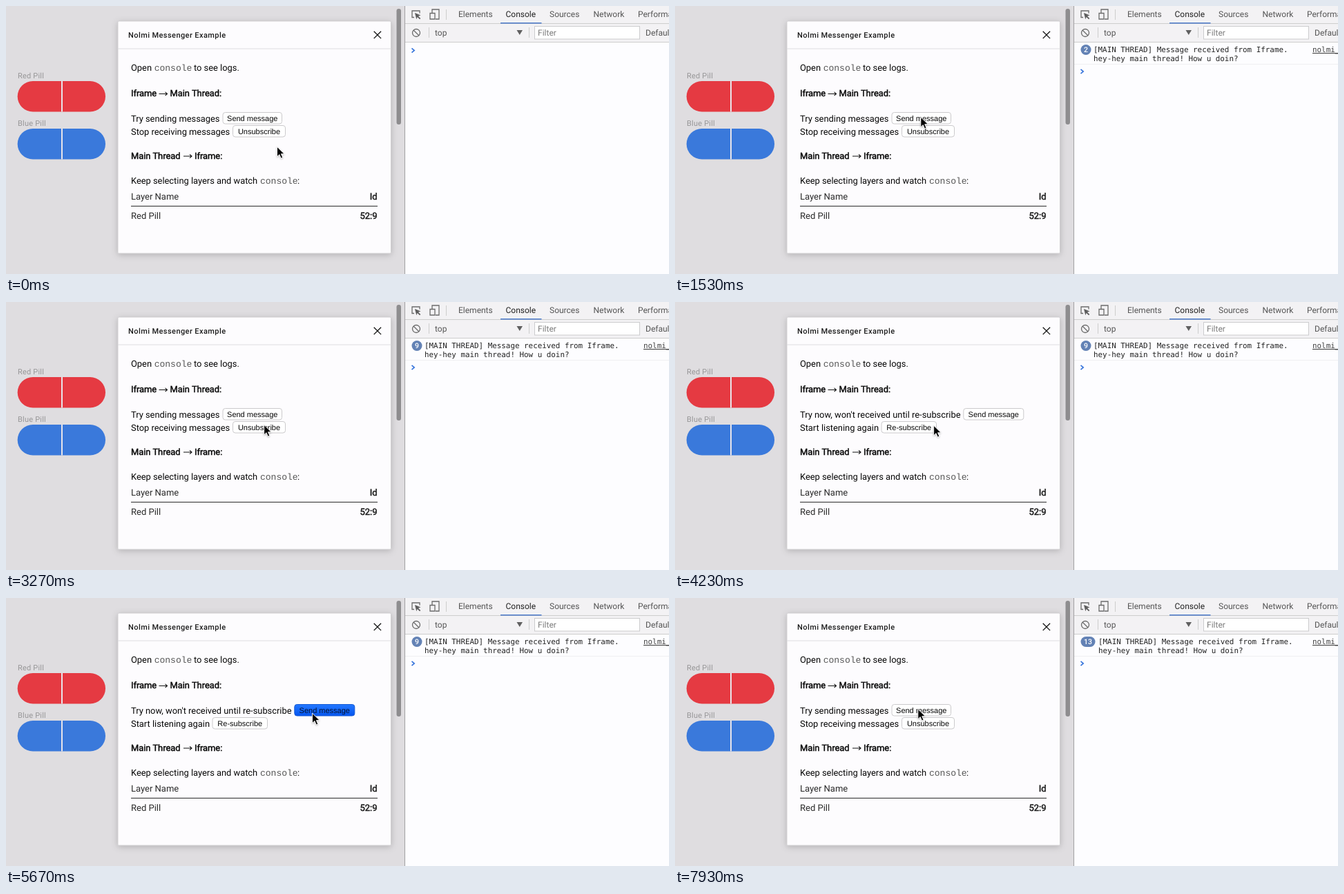
Recreate the animation shown at these times as an HTML page. Size 960 by 389 pixels, loop 8000 ms.

```html
<!DOCTYPE html>
<html lang="en">
<head>
<meta charset="utf-8">
<title>Messenger example</title>
<style>
  html, body { margin: 0; width: 100%; height: 100%; overflow: hidden; background: #dfdde0; }
  svg { display: block; width: 960px; height: 389px; }
  text { font: 12.87px Roboto, sans-serif; fill: #080808; white-space: pre; text-rendering: geometricPrecision; }
  .code { font: 13px "Liberation Mono", monospace; fill: #555; }
  .bold { stroke: #080808; stroke-width: .45px; }
  .title { font-weight: 500; font-size: 11px; letter-spacing: .42px; fill: #1c1c1c; }
  .label { font-size: 11px; letter-spacing: .2px; fill: #979697; }
  .cell { font-size: 13px; fill: #2b2b2b; }
  .tool { font-size: 12px; fill: #555; }
  .log { font: 10.88px "DejaVu Sans Mono", monospace; fill: #222; }
  .count { font: 500 10.5px Roboto, sans-serif; fill: #fff; text-anchor: middle; }
  .button text { font: 11px "Liberation Sans", sans-serif; fill: #080808; text-anchor: middle; }
  .button rect { fill: #fff; stroke: #cbcacc; }
  .button.down rect { fill: url(#press); stroke: #1459d4; }
  .button.down text { fill: #021234; }
  .end { text-anchor: end; }
  .line { fill: none; stroke: #6b6b6b; stroke-width: 1.3; }
  .rule { stroke: #cdcdcd; }
</style>
</head>
<body>
<svg viewBox="0 0 960 389">
  <defs>
    <linearGradient id="press" x2="0" y2="1">
      <stop stop-color="#2478ff"/><stop offset="1" stop-color="#0455f0"/>
    </linearGradient>
    <filter id="shadow" x="-10%" y="-10%" width="120%" height="120%">
      <feDropShadow dx="0" dy="2" stdDeviation="5" flood-opacity=".2"/>
    </filter>
    <filter id="soft" x="-50%" y="-50%" width="200%" height="200%">
      <feDropShadow dx="0" dy="1" stdDeviation="1" flood-opacity=".3"/>
    </filter>
    <path id="arrow" d="M0 0H12M9 -2.7L12 0L9 2.7" fill="none" stroke="#111" stroke-width="1.1"/>
  </defs>

  <rect width="577" height="389" fill="#dfdde0"/>
  <text class="label" x="17" y="105">Red Pill</text>
  <rect x="16.7" y="109" width="127.3" height="44.5" rx="22.2" fill="#e53a42"/>
  <text class="label" x="17" y="174">Blue Pill</text>
  <rect x="16.7" y="178" width="127.3" height="44.5" rx="22.2" fill="#3a79db"/>
  <path d="M81 109v44.5M81 178v44.5" stroke="#e8e5ea" stroke-width="2"/>
  <rect x="565.5" y="4" width="6.5" height="168" rx="3.2" fill="#8e8d8f"/>

  <rect x="162" y="22" width="395.5" height="337" rx="1.5" fill="#fdfcfe" stroke="#c4c3c4" stroke-width=".7" filter="url(#shadow)"/>
  <path d="M162 62h395.5" stroke="#dedde0"/>
  <text class="title" x="177" y="45.5">Nolmi</text>
  <text class="title" x="211.5" y="45.5">Messenger Example</text>
  <path d="M532.7 36.7l10.4 10.4m0 -10.4l-10.4 10.4" stroke="#111" stroke-width="1.3"/>

  <text x="181" y="94">Open</text>
  <text class="code" x="214.7" y="94">console</text>
  <text x="272" y="94">to see logs.</text>
  <text class="bold" x="181" y="131">Iframe</text>
  <use href="#arrow" x="221.5" y="127.5"/>
  <text class="bold" x="237.5" y="131">Main Thread:</text>
  <text id="sendLabel" x="181" y="167.5"></text>
  <text id="listenLabel" x="181" y="186.5"></text>
  <g id="send" class="button"><rect y="154.5" height="16.5" rx="3.5"/><text y="167"></text></g>
  <g id="toggle" class="button"><rect y="173.5" height="16.5" rx="3.5"/><text y="186"></text></g>
  <text class="bold" x="181" y="221.5">Main Thread</text>
  <use href="#arrow" x="257" y="218"/>
  <text class="bold" x="273" y="221.5">Iframe:</text>
  <text x="181" y="257.5">Keep selecting layers and watch</text>
  <text class="code" x="368" y="257.5">console</text>
  <text x="422" y="257.5">:</text>
  <text class="cell" x="181" y="281">Layer Name</text>
  <text class="cell bold end" x="537.5" y="281">Id</text>
  <path d="M181 290.5h357" stroke="#2b2b2b"/>
  <text class="cell" x="181" y="309">Red Pill</text>
  <text class="cell bold end" x="537.5" y="309">52:9</text>

  <rect x="577" width="383" height="389" fill="#fdfdff"/>
  <rect x="577" width="383" height="52" fill="#f3f2f4"/>
  <path class="rule" d="M577 25.5h383M577 52.5h383M637.5 5v15M612.5 31v15M757.5 31v15"/>
  <path d="M577.5 0v389" stroke="#a2a1a3"/>
  <path d="M716 24.8h59.5" stroke="#4979c9" stroke-width="1.4"/>
  <path class="line" d="M591 16.5h-3v-9.5h11v3.5"/>
  <path d="M592 10l8.5 3.5l-3.5 1.2l3.3 3.3l-1.3 1.3l-3.3 -3.3l-1.4 3.2z" fill="#5d5d5d"/>
  <path class="line" d="M617 10V5h10v14h-5M614 10.5h7v8.5h-7z"/>
  <circle class="line" cx="594" cy="39" r="5.5"/>
  <path class="line" d="M590 35l8 8"/>
  <text class="tool" x="655" y="16">Elements</text>
  <text class="tool" x="723.5" y="16" style="fill:#222">Console</text>
  <text class="tool" x="787" y="16">Sources</text>
  <text class="tool" x="850.5" y="16">Network</text>
  <text class="tool" x="915" y="16">Performance</text>
  <text class="tool" x="621" y="43">top</text>
  <path d="M739.5 35h8.5l-4.25 7z" fill="#606060"/>
  <rect x="765.5" y="29.5" width="152" height="18.5" fill="#fff" stroke="#cbcbcd"/>
  <text class="tool" x="770" y="43" style="fill:#7c7c7c">Filter</text>
  <text class="tool" x="926" y="43">Default levels</text>

  <g id="message">
    <rect id="badge" x="587.5" y="56" height="15" rx="7.5" fill="#6382b5"/>
    <text id="count" class="count" y="67.2"></text>
    <g id="words">
      <text class="log" x="606" y="67">[MAIN THREAD] Message received from Iframe.</text>
      <text class="log" x="606" y="80">hey-hey main thread! How u doin?</text>
    </g>
    <text class="log" x="923" y="67" text-decoration="underline" style="fill:#444">nolmi_main</text>
    <path d="M578 84.5h382" stroke="#efeff1"/>
  </g>
  <path id="prompt" d="M587.5 -3.2l3.7 3.2l-3.7 3.2" fill="none" stroke="#3b78dc" stroke-width="1.7"/>

  <path id="cursor" d="M0 0V14.5L3.4 11.3L5.7 16.8L8.2 15.7L5.9 10.4H10.6Z" fill="#050505" stroke="#fff" stroke-width=".9" filter="url(#soft)"/>
</svg>
<script>
const LOOP = 8000, HOLD = 100, GAP = 210;
const $ = id => document.getElementById(id);
const series = (first, n) => Array.from({ length: n }, (_, i) => first + i * GAP);

// Times at which the mouse button is released.
const heard = [...series(1260, 9), ...series(7260, 4)];
const sends = [...heard, ...series(5080, 4)];
const toggles = [3700, 6560];

// Cursor moves: start, end, target x, target y.
const moves = [
  [0, 0, 392.5, 204.3], [180, 900, 355.8, 161.3], [3030, 3310, 374.6, 179.3],
  [4330, 4800, 443.5, 167.2], [5830, 6330, 355.8, 185.3], [6830, 7100, 351.8, 161.3]
];

const layouts = {
  on: {
    labels: ["Try sending messages", "Stop receiving messages"],
    send: [314, 85.5], toggle: [328.5, 76, "Unsubscribe"]
  },
  off: {
    labels: ["Try now, won't received until re-subscribe", "Start listening again"],
    send: [417.8, 87], toggle: [299, 79.5, "Re-subscribe"]
  }
};

const pressed = (times, t) => times.some(end => t >= end - HOLD && t < end);

function cursorAt(t) {
  let [, , x, y] = moves[0];
  for (const [start, end, tx, ty] of moves.slice(1)) {
    const p = Math.min(1, Math.max(0, (t - start) / (end - start)));
    const e = p * p * (3 - 2 * p);
    x += (tx - x) * e;
    y += (ty - y) * e;
  }
  return [x, y];
}

function drawButton(id, x, width, label, down) {
  const [box, text] = $(id).children;
  box.setAttribute("x", x);
  box.setAttribute("width", width);
  text.setAttribute("x", x + width / 2);
  text.textContent = label;
  $(id).classList.toggle("down", down);
}

function draw(t) {
  const { labels, send, toggle } = layouts[t >= toggles[0] && t < toggles[1] ? "off" : "on"];
  $("sendLabel").textContent = labels[0];
  $("listenLabel").textContent = labels[1];
  drawButton("send", ...send, "Send message", pressed(sends, t));
  drawButton("toggle", ...toggle, pressed(toggles, t));

  const count = heard.filter(time => time <= t).length;
  const wide = count > 9;
  $("message").style.display = count ? "" : "none";
  $("count").textContent = count;
  $("count").setAttribute("x", wide ? 598 : 595);
  $("badge").setAttribute("width", wide ? 21 : 15);
  $("words").setAttribute("transform", `translate(${wide ? 7 : 0} 0)`);
  $("prompt").setAttribute("transform", `translate(0 ${count ? 95 : 64.5})`);
  $("cursor").setAttribute("transform", `translate(${cursorAt(t)})`);
}

const began = performance.now();
function tick() {
  draw((performance.now() - began) % LOOP);
  requestAnimationFrame(tick);
}
tick();
</script>
</body>
</html>
```
